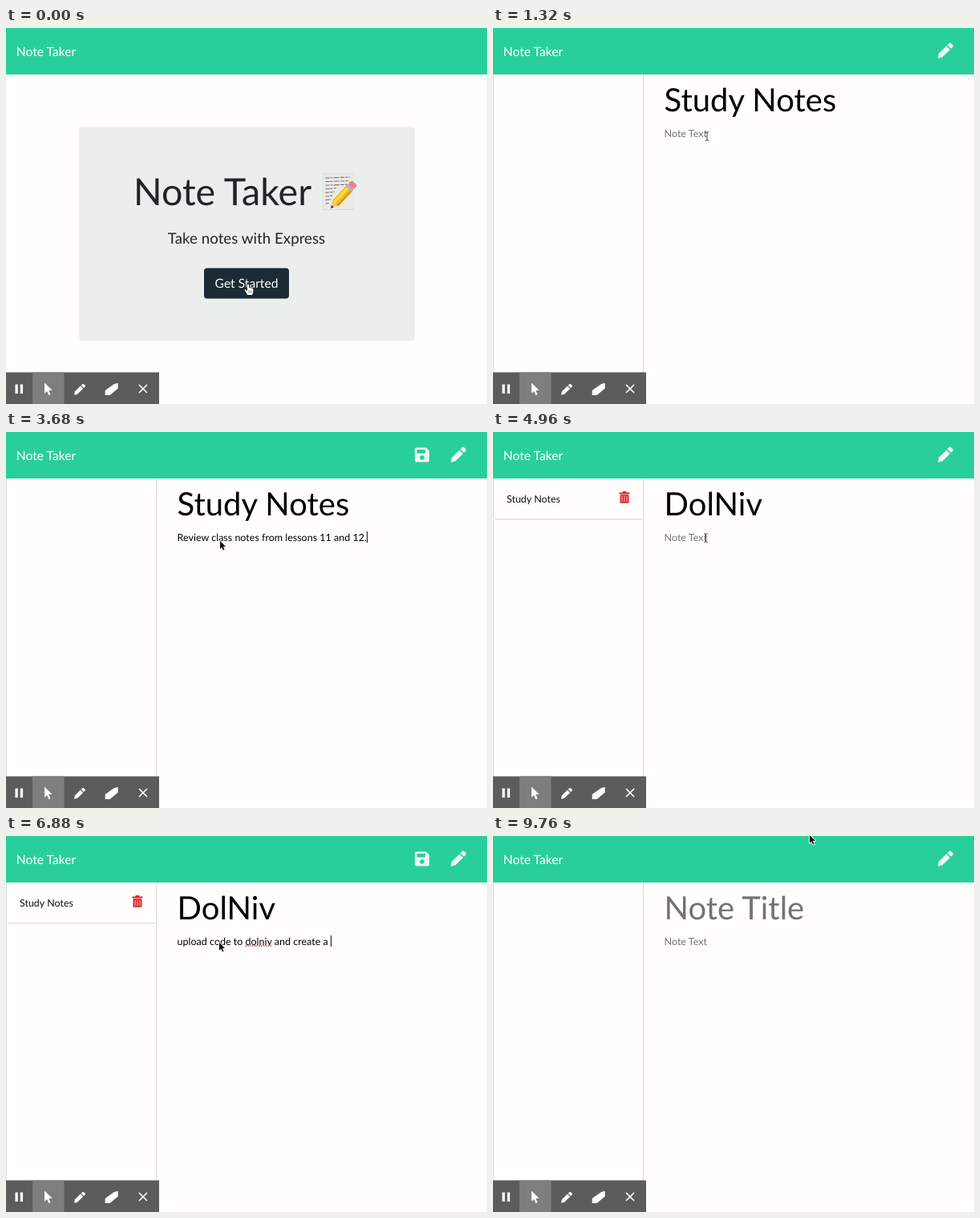
Recreate the animation shown at these times as an HTML page with a canvas. Size 600 by 469 pixels, loop 9840 ms.

```html
<!DOCTYPE html>
<html lang="en">
<head>
<meta charset="utf-8">
<title>Note Taker</title>
<style>
html, body { margin: 0; width: 100%; height: 100%; overflow: hidden; background: #fffefd; }
canvas { display: block; }
</style>
</head>
<body>
<canvas id="stage" width="600" height="469"></canvas>
<script>
const ctx = document.getElementById('stage').getContext('2d');
// Fractional glyph advances keep small text from spreading.
ctx.textRendering = 'geometricPrecision';
ctx.fontKerning = 'normal';

const LOOP = 9840;
const GREEN = '#29cf9b', PAPER = '#fffefd', LIGHT = '#eef7f3', MUTED = '#737373';
const TEXT_X = 213.6;
const HEADER_H = 58;
const PAGE_OPEN = 200;

// keys: [time, typed characters]
const notes = [
  {
    title: 'Study Notes', body: 'Review class notes from lessons 11 and 12.',
    titleKeys: [[600, 0], [1220, 11]], bodyKeys: [[1600, 0], [3600, 42]],
    from: PAGE_OPEN, titleFocus: 500, bodyFocus: 1360, blur: 3800, saved: 3960, removed: 8960
  },
  {
    title: 'DolNiv', body: 'upload code to dolniv and create a readme file.', misspelt: 'dolniv',
    titleKeys: [[4480, 0], [4840, 6]],
    bodyKeys: [[5200, 0], [5640, 10], [5800, 10], [6760, 33], [6870, 35], [7000, 35], [7600, 47]],
    from: 3960, titleFocus: 4320, bodyFocus: 5000, blur: 8280, saved: 8480, removed: 9320
  }
];

// [time, x, y, pointer shape from here on]
const path = [
  [0, 302, 320, 'hand'], [200, 302, 320, 'arrow'], [460, 267, 92, 'beam'],
  [1120, 267, 92, 'beam'], [1290, 267, 135, 'beam'], [1640, 267, 136, 'arrow'],
  [3690, 267, 136, 'arrow'], [3800, 521.5, 28, 'hand'], [3980, 521.5, 28, 'arrow'],
  [4280, 265, 92, 'beam'], [4720, 265, 92, 'beam'], [4900, 265.5, 132, 'beam'],
  [5240, 266, 133, 'arrow'], [7840, 266, 133, 'arrow'], [8200, 521.5, 28, 'hand'],
  [8480, 521.5, 28, 'arrow'], [8780, 165, 82, 'hand'], [9340, 165, 82, 'arrow'],
  [9720, 395, -1, 'arrow'], [LOOP, 395, -1, 'arrow']
];
const clicks = [60, 480, 1360, 3800, 4300, 5000, 8280, 8800, 9160];
const RING_TIME = 160;

const lerp = (a, b, k) => a + (b - a) * k;

function keyIndex(keys, t) {
  let i = 0;
  while (i < keys.length - 2 && t >= keys[i + 1][0]) i++;
  return i;
}

function typedCount(keys, t) {
  const i = keyIndex(keys, t), [t0, n0] = keys[i], [t1, n1] = keys[i + 1];
  const k = Math.min(1, Math.max(0, (t - t0) / (t1 - t0)));
  return Math.floor(lerp(n0, n1, k));
}

function pointerAt(t) {
  const i = keyIndex(path, t), a = path[i], b = path[i + 1];
  const k = (t - a[0]) / (b[0] - a[0]), e = k * k * (3 - 2 * k);
  return { x: lerp(a[1], b[1], e), y: lerp(a[2], b[2], e), shape: a[3] };
}

function setFont(size) {
  ctx.font = `${size}px Lato, sans-serif`;
}

function text(str, x, y, size, color, align = 'left') {
  setFont(size);
  ctx.textAlign = align;
  ctx.fillStyle = color;
  ctx.fillText(str, x, y);
}

function rect(x, y, w, h, color, r = 0) {
  ctx.fillStyle = color;
  ctx.beginPath();
  ctx.roundRect(x, y, w, h, r);
  ctx.fill();
}

function disc(x, y, r, color) {
  ctx.fillStyle = color;
  ctx.beginPath();
  ctx.arc(x, y, r, 0, 7);
  ctx.fill();
}

function line(x0, y0, x1, y1, color, width = 1) {
  ctx.strokeStyle = color;
  ctx.lineWidth = width;
  ctx.beginPath();
  ctx.moveTo(x0, y0);
  ctx.lineTo(x1, y1);
  ctx.stroke();
}

function shape(d, x, y, scale, fill, stroke, width = 1) {
  const p = new Path2D(d);
  ctx.save();
  ctx.translate(x, y);
  ctx.scale(scale, scale);
  ctx.lineJoin = 'round';
  if (stroke) {
    ctx.strokeStyle = stroke;
    ctx.lineWidth = width;
    ctx.stroke(p);
  }
  ctx.fillStyle = fill;
  ctx.fill(p);
  ctx.restore();
}

const PENCIL = 'M0 20L1.2 14.2 11 4.4 15.6 9 5.8 18.8ZM12.2 3.2L14.5.9Q15.6-.2 16.8.9L19.1 3.2Q20.3 4.4 19.1 5.5L16.8 7.8Z';
const ARROW = 'M0 0V10.2L2.4 8 4.1 12 5.8 11.3 4.1 7.4H7.4Z';
const HAND = 'M-1 0Q0-1.2 1 0V4.2Q2 3.2 2.8 4.4 4 3.6 4.7 5 6.4 4.4 6.4 6.4V9Q6 11 5 13H-.8Q-1.6 11.4-2.4 10L-4.4 7.2Q-4.2 5.8-2.8 6.4L-1 8Z';
const ERASER = 'M0 9L11 1.2 15 0H16V6.4L6.5 14.6 5 15H0Z';
const FLOPPY = 'M2 0H14L18 4V16Q18 18 16 18H2Q0 18 0 16V2Q0 0 2 0Z';

function header() {
  rect(0, 0, 600, HEADER_H, GREEN);
  text('Note Taker', 12.8, 34.6, 15.625, '#fff');
}

function saveIcon() {
  shape(FLOPPY, 510, 19.5, 1, LIGHT);
  rect(512.5, 22, 10.5, 4.6, GREEN);
  disc(519, 32, 2.8, GREEN);
}

function trashIcon(x, y) {
  const red = '#d9272e';
  rect(x, y + 1.5, 13, 2, red, 0.5);
  rect(x + 4, y, 5, 2, red, 0.7);
  rect(x + 1, y + 4.2, 11, 10.5, red, 1);
  for (const dx of [3.5, 6.5, 9.5]) line(x + dx, y + 6, x + dx, y + 13, '#f6c5c5', 1);
}

function memo() {
  rect(395, 181, 39, 46, '#d9dbd9');
  rect(395.5, 181.5, 38, 44.5, '#eceae6');
  ctx.setLineDash([5, 1, 3, 1.4, 7, 1.2]);
  for (let i = 0; i < 8; i++) {
    const y = 187 + i * 4.6;
    line(398.5, y, i < 3 ? 429 - i : 419 - i * 2.3, y - 1, '#777', 1.1);
  }
  ctx.setLineDash([]);
  ctx.save();
  ctx.translate(405, 225);
  ctx.rotate(-0.82);
  shape('M0 0L9-5V5Z', 0, 0, 1, '#efc68d');
  shape('M0 0L3.5-2V2Z', 0, 0, 1, '#333');
  rect(8.5, -5, 25, 10, '#f5b913');
  rect(8.5, -3.5, 25, 3.5, '#ffdb4a');
  rect(8.5, 3, 25, 2, '#d7930f');
  rect(33, -5, 4, 10, '#aeb5b6');
  rect(36.5, -5, 7, 10, '#ed8290', 3);
  ctx.restore();
}

function landing() {
  rect(91, 123.5, 419, 266.5, '#eaeeed', 4);
  text('Note Taker', 159, 221, 46.67, '#212529');
  memo();
  text('Take notes with Express', 300, 268.6, 18.75, '#212529', 'center');
  rect(247, 299.5, 106, 38, '#1d2a34', 4);
  text('Get Started', 300, 324.3, 15.625, '#fff', 'center');
}

function sidebar(t) {
  line(0.5, HEADER_H, 0.5, 430, '#dededd');
  line(187.5, HEADER_H, 187.5, 430, '#dadad9');
  notes.filter(n => t >= n.saved && t < n.removed).forEach((n, i) => {
    const y = 57 + i * 52;
    line(2, y + 51.5, 186, y + 51.5, '#e0e0df');
    line(3, y + 52.5, 185, y + 52.5, '#f0f0ef');
    text(n.title, 16.9, y + 30.8, 12.5, '#111');
    trashIcon(157.5, y + 17);
  });
}

function caret(str, size, top, height, idle) {
  if (idle % 1000 > 500) return;
  setFont(size);
  rect(Math.round(TEXT_X + ctx.measureText(str).width), top, 1, height, '#111');
}

function misspelling(str, word) {
  const at = str.indexOf(word + ' ');
  if (at < 0) return;
  setFont(12.5);
  const x = TEXT_X + ctx.measureText(str.slice(0, at)).width;
  ctx.setLineDash([1.6, 1.2]);
  line(x, 137, x + ctx.measureText(word).width, 137, '#e0393e', 1.4);
  ctx.setLineDash([]);
}

function editor(t) {
  shape(PENCIL, 554.8, 18.2, 0.98, LIGHT);
  const note = notes.find(n => t >= n.from && t < n.saved);
  const title = note ? note.title.slice(0, typedCount(note.titleKeys, t)) : '';
  const body = note ? note.body.slice(0, typedCount(note.bodyKeys, t)) : '';
  text(title || 'Note Title', TEXT_X, 104, 40, title ? '#000' : MUTED);
  text(body || 'Note Text', TEXT_X, 135.8, 12.5, body ? '#000' : MUTED);
  if (!note) return;
  if (title && body) saveIcon();
  if (note.misspelt) misspelling(body, note.misspelt);
  const idle = keys => Math.max(0, t - keys[keys.length - 1][0]);
  if (t >= note.bodyFocus && t < note.blur) caret(body, 12.5, 124, 14, idle(note.bodyKeys));
  else if (t >= note.titleFocus && t < note.bodyFocus - 60) caret(title, 40, 68.5, 41, idle(note.titleKeys));
}

function toolbar() {
  rect(0, 429.5, 191, 39.5, '#5d5c5c');
  rect(33, 429.5, 39.5, 39.5, '#7f7e7e');
  rect(11.5, 444.5, 3.3, 11.5, '#fff');
  rect(17.8, 444.5, 3.3, 11.5, '#fff');
  shape(ARROW, 48, 442.5, 1.3, '#fff');
  shape(PENCIL, 85, 443.5, 0.71, '#fff');
  shape(ERASER, 123.7, 443, 1, '#fff');
  line(166, 445, 176, 455, '#fff', 1.6);
  line(176, 445, 166, 455, '#fff', 1.6);
}

function ring(x, y) {
  ctx.strokeStyle = '#c9443f';
  ctx.lineWidth = 3;
  ctx.setLineDash([2.2, 0.6]);
  ctx.beginPath();
  ctx.arc(x, y, 26.5, 0, Math.PI * 2);
  ctx.stroke();
  ctx.setLineDash([]);
}

function beam(x, y) {
  line(x, y - 5, x, y + 5, '#444');
  for (const s of [-1, 1]) {
    line(x, y + s * 4.6, x - 2.3, y + s * 5.6, '#444');
    line(x, y + s * 4.6, x + 2.3, y + s * 5.6, '#444');
  }
}

function pointer(t) {
  const { x, y, shape: kind } = pointerAt(t);
  if (clicks.some(c => t >= c && t < c + RING_TIME)) ring(x, y + 0.5);
  if (kind === 'hand') {
    shape(HAND, x, y, 1, '#fff', '#222', 1.3);
    for (const dx of [0.8, 2.5, 4.2]) line(x + dx, y + 7.5, x + dx, y + 10.5, '#555', 0.6);
  } else if (kind === 'arrow') {
    shape(ARROW, x, y, 0.96, '#111', '#fff', 1.8);
  } else {
    beam(x, y);
  }
}

function draw(t) {
  rect(0, 0, 600, 469, PAPER);
  header();
  if (t < PAGE_OPEN) landing();
  else {
    sidebar(t);
    editor(t);
  }
  toolbar();
  pointer(t);
}

const start = performance.now();
function frame() {
  draw((performance.now() - start) % LOOP);
  requestAnimationFrame(frame);
}
frame();
</script>
</body>
</html>
```
